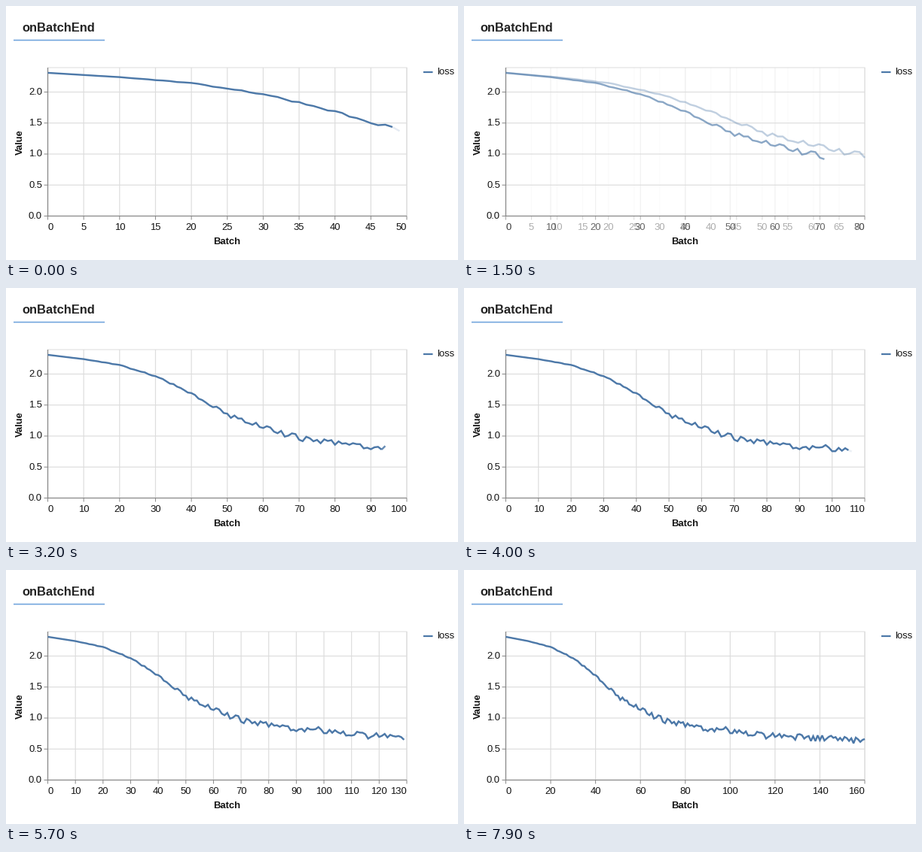
Recreate the animation shown at these times as a matplotlib script. Size 600 by 338 pixels, loop 8 s.

```python
import math

import matplotlib.pyplot as plt
import numpy as np
from matplotlib.animation import FuncAnimation

W, H, DPI = 600, 338, 100
FRAMES, INTERVAL = 80, 100
LEFT, RIGHT, TOP, BASE = 55.5, 532, 82, 279.5
UNIT = 82.5  # pixels per 1.0 of loss
PX = 72 / DPI
BLUE, GRID, AXIS, INK = "#4c78a8", "#dddddd", "#888888", "#111111"

plt.rcParams["font.family"] = "Liberation Sans"
plt.rcParams["path.snap"] = False


def loss_curve(count):
    """Falling trend, one key value per ten batches, with growing jitter."""
    trend = [2.31, 2.24, 2.145, 1.965, 1.685, 1.345, 1.13, 0.97, 0.905,
             0.835, 0.80, 0.74, 0.71, 0.69, 0.67, 0.65, 0.63]
    k = np.arange(count)
    rng = np.random.default_rng(4)
    jitter = 0.055 * np.minimum(1, (k / 65) ** 2) * rng.uniform(-1, 1, count)
    return np.interp(k, np.arange(len(trend)) * 10, trend) + jitter


loss = loss_curve(162)


def batch_at(i):
    """Number of the latest batch, with its fade-in as the fraction."""
    return np.interp(i, [0, 15, 25, FRAMES - 1], [48.15, 70.65, 84, 160])


def nice(n):
    """Rounded axis end and tick step for about ten ticks."""
    power = 10 ** math.floor(math.log10(n / 10))
    ratio = n / 10 / power
    factor = (10 if ratio >= 50 ** 0.5 else 5 if ratio >= 10 ** 0.5
              else 2 if ratio >= 2 ** 0.5 else 1)
    step = int(factor * power)
    return math.ceil(n / step) * step, step


fig = plt.figure(figsize=(W / DPI, H / DPI), dpi=DPI, facecolor="white")
ax = fig.add_axes([0, 0, 1, 1])
ax.set_xlim(0, W)
ax.set_ylim(H, 0)
ax.axis("off")
moving = []


def line(xs, ys, color, width=1.0, **kw):
    return ax.plot(xs, ys, color=color, lw=width * PX,
                   solid_capstyle="butt", **kw)[0]


def label(x, y, s, size=13, **kw):
    kw = {"va": "baseline", "color": INK} | kw
    return ax.text(x, y, s, fontsize=size * PX, **kw)


def draw_static():
    label(21.3, 34.5, "onBatchEnd", 16.5, weight="bold", color="#222222")
    line([10, 131], [45.5, 45.5], "#6fa3dc", 1.6)

    line([LEFT, RIGHT, RIGHT], [TOP, TOP, BASE], GRID, zorder=1)
    for k in range(5):
        y = BASE - k * UNIT / 2
        line([LEFT, RIGHT], [y, y], GRID, 1.2, zorder=1)
        line([LEFT - 5, LEFT], [y, y], AXIS, zorder=2)
        label(48, y + 3.4, f"{k / 2:.1f}", ha="right")
    line([LEFT, LEFT], [TOP, BASE + 0.5], AXIS, 1.2, zorder=2)
    line([LEFT, RIGHT], [BASE, BASE], AXIS, 1.2, zorder=2)

    label(293.5, 317, "Batch", weight="bold", ha="center")
    label(18.5, 181, "Value", weight="bold", ha="center", va="center", rotation=90)
    line([554, 566.5], [88, 88], BLUE, 2.2)
    label(572, 91, "loss")


def draw_axis(top, step, alpha):
    for v in range(0, top + 1, step):
        x = LEFT + v / top * (RIGHT - LEFT)
        ha = "left" if v == 0 else "right" if v == top else "center"
        moving.append(line([x, x], [TOP, BASE], GRID, 1.2, alpha=alpha ** 2, zorder=1))
        moving.append(line([x, x], [BASE, BASE + 5], AXIS, alpha=alpha, zorder=2))
        moving.append(label(x, 298, str(v), ha=ha, alpha=alpha))


def draw_curve(first, last, top, alpha):
    k = np.arange(first, last + 1)
    xs = LEFT + k / top * (RIGHT - LEFT)
    moving.append(line(xs, BASE - loss[k] * UNIT, BLUE, 2.4, alpha=alpha,
                       solid_joinstyle="miter", zorder=3))


def update(i):
    while moving:
        moving.pop().remove()
    n = batch_at(i)
    last = math.floor(n + 1e-9)
    fade = max(0.0, n - last)
    (top, step), (new_top, new_step) = nice(last), nice(last + 1)
    if top == new_top or fade < 0.01:
        draw_axis(top, step, 1)
        draw_curve(0, last, top, 1)
        if fade > 0.01:
            draw_curve(last, last + 1, top, fade)
    else:
        # the axis rescales: cross-fade both states
        draw_axis(top, step, 1 - fade)
        draw_axis(new_top, new_step, fade)
        draw_curve(0, last, top, 1 - fade)
        draw_curve(0, last + 1, new_top, fade)
    return moving


draw_static()
anim = FuncAnimation(fig, update, frames=FRAMES, interval=INTERVAL,
                     init_func=lambda: update(0), repeat=True, repeat_delay=0)
plt.show()
```
